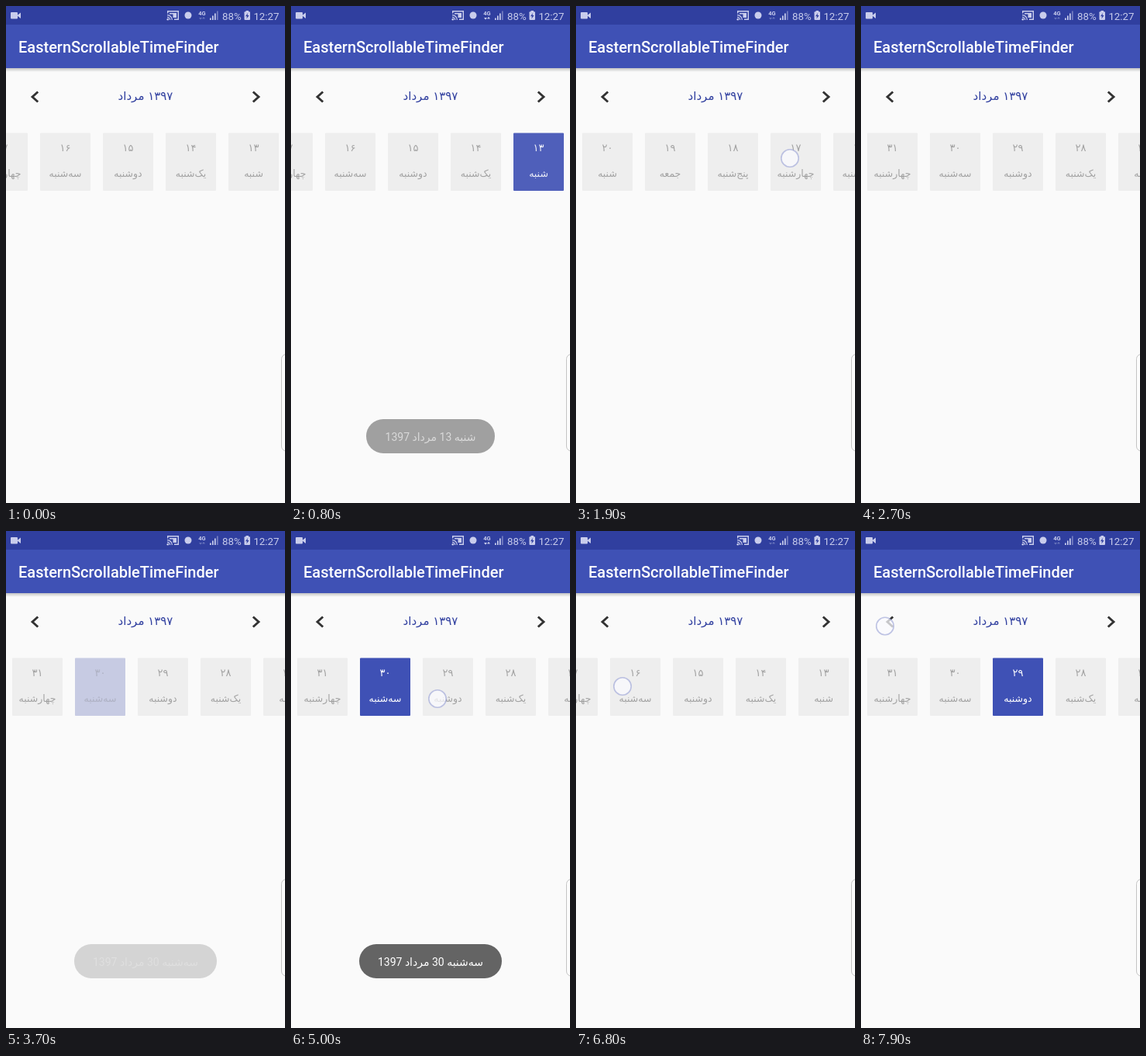
An HTML page with a canvas that plays this animation: 360 by 640 pixels, repeating every 8000 ms.

```html
<!DOCTYPE html>
<html lang="fa">
<head>
<meta charset="utf-8">
<title>Date strip</title>
<style>
html, body { margin: 0; width: 100%; height: 100%; overflow: hidden; background: #fafafa; }
canvas { display: block; width: 360px; height: 640px; }
</style>
</head>
<body>
<canvas id="stage"></canvas>
<script>
const LOOP = 8000, STEP = 100;
const BLUE = '#3f51b5', PAGE = '#fafafa', ICON = '#c9cdec';
const LATIN = 'Roboto, sans-serif';
const PERSIAN = '"DejaVu Sans", sans-serif';
const MIXED = 'Roboto, "DejaVu Sans", sans-serif';
const WEEK = ['شنبه', 'یک\u200cشنبه', 'دوشنبه', 'سه\u200cشنبه', 'چهارشنبه', 'پنج\u200cشنبه', 'جمعه'];
const FIRST_X = 287, PITCH = 81, END = 1179;

const canvas = document.getElementById('stage');
const ctx = canvas.getContext('2d');
const dpr = window.devicePixelRatio || 1;
canvas.width = 360 * dpr;
canvas.height = 640 * dpr;

const ramp = (t, a, b) => Math.min(1, Math.max(0, (t - a) / (b - a)));
const linear = p => p;
const easeIn = p => p * p;
const easeOut = p => 1 - (1 - p) ** 3;

// start, end, offset before, offset after, easing
const scrolls = [
  [1500, 1900, 0, 288, easeIn],
  [1900, 2600, 288, END, easeOut],
  [5700, 5800, END, 1079, linear],
  [5800, 6000, 1079, 224, linear],
  [6000, 6300, 224, 0, easeOut],
  [6800, 7100, 0, 260, easeIn],
  [7100, 7600, 260, END, easeOut]
];

// day, fade in, fade out
const picks = [
  [13, 600, 820, 3640, 3900],
  [30, 3640, 3900, 5200, 5450],
  [29, 5200, 5450, 9000, 9100]
];

// day, width, fade in, fade out
const toasts = [
  [13, 166, 620, 920, 1300, 1600],
  [30, 184, 3600, 3990, 5050, 5300],
  [29, 180, 5300, 5600, 5820, 6230]
];

// shown, hidden, move end, from x y, to x y
const touches = [
  [100, 400, 400, 317, 204, 317, 204],
  [1500, 2000, 1900, 40, 200, 276, 196],
  [3300, 3600, 3600, 121, 206, 121, 206],
  [5000, 5300, 5300, 189, 216, 189, 216],
  [5600, 5900, 5900, 340, 205, 150, 203],
  [6800, 7200, 7100, 60, 200, 300, 198],
  [7900, 8000, 8000, 31, 122.5, 31, 122.5]
];

const persianDigits = n => String(n).replace(/\d/g, d => String.fromCharCode(0x6f0 + +d));
const weekday = day => WEEK[(day - 13) % 7];

function scrollAt(t) {
  let x = 0;
  for (const [a, b, from, to, ease] of scrolls)
    if (t >= a) x = from + (to - from) * ease(ramp(t, a, b));
  return x;
}

function pickLevel(day, t) {
  const p = picks.find(k => k[0] === day);
  return p ? ramp(t, p[1], p[2]) * (1 - ramp(t, p[3], p[4])) : 0;
}

function text(s, x, y, font, color, align = 'center', dir = 'rtl') {
  ctx.font = font;
  ctx.fillStyle = color;
  ctx.textAlign = align;
  ctx.direction = dir;
  ctx.fillText(s, x, y);
}

function rect(x, y, w, h, color, r = 0) {
  ctx.fillStyle = color;
  ctx.beginPath();
  ctx.roundRect(x, y, w, h, r);
  ctx.fill();
}

function line(points, color, width) {
  ctx.strokeStyle = color;
  ctx.lineWidth = width;
  ctx.beginPath();
  points.forEach(([x, y]) => ctx.lineTo(x, y));
  ctx.stroke();
}

function shape(points, color) {
  ctx.fillStyle = color;
  ctx.beginPath();
  points.forEach(([x, y]) => ctx.lineTo(x, y));
  ctx.fill();
}

function disc(x, y, r, color) {
  ctx.fillStyle = color;
  ctx.beginPath();
  ctx.arc(x, y, r, 0, Math.PI * 2);
  ctx.fill();
}

function castIcon() {
  line([[208.7, 9.5], [208.7, 6.7], [222.3, 6.7], [222.3, 17.3], [217, 17.3]], ICON, 1.4);
  rect(211, 9, 9, 6, ICON);
  rect(208, 10.5, 7.5, 7.5, '#303f9f');
  disc(208.8, 17.2, 1.3, ICON);
  ctx.lineWidth = 1.2;
  for (const r of [3.6, 6.3]) {
    ctx.beginPath();
    ctx.arc(208, 18, r, -Math.PI / 2, 0);
    ctx.stroke();
  }
}

function statusBar(t) {
  rect(0, 0, 360, 24, '#303f9f');
  rect(6, 8, 9, 8.5, ICON, 1);
  shape([[14.5, 12], [19, 8.5], [19, 16], [14.5, 12.6]], ICON);
  castIcon();
  disc(235, 12, 4.5, ICON);
  text('4G', 253, 12, 'bold 7.5px ' + LATIN, ICON, 'center', 'ltr');

  const busy = (t >= 400 && t < 1500) || (t >= 3900 && t < 5500);
  ctx.globalAlpha = busy ? 1 : 0.35;
  shape([[249, 15], [253, 15], [251, 17.8]], ICON);
  shape([[253, 16.5], [257, 16.5], [255, 13.7]], ICON);
  ctx.globalAlpha = 1;

  for (let i = 0; i < 4; i++) {
    ctx.globalAlpha = i < 3 ? 1 : 0.45;
    rect(263 + i * 3, 15.5 - i * 3, 1.7, 2.5 + i * 3, ICON);
  }
  ctx.globalAlpha = 1;

  text('88%', 279, 17.5, '13.3px ' + LATIN, ICON, 'left', 'ltr');
  rect(309.5, 6, 3.5, 2, ICON);
  rect(307.5, 7.3, 7.5, 10.7, ICON, 1);
  shape([[312, 9], [309, 13.2], [311, 13.2], [310.4, 16.4], [313.6, 12], [311.5, 12]], '#303f9f');
  text('12:27', 352.5, 17.5, '13.3px ' + LATIN, ICON, 'right', 'ltr');
}

function header() {
  const shade = ctx.createLinearGradient(0, 80, 0, 85);
  shade.addColorStop(0, 'rgba(0,0,0,.22)');
  shade.addColorStop(1, 'rgba(0,0,0,0)');
  ctx.fillStyle = shade;
  ctx.fillRect(0, 80, 360, 5);
  rect(0, 24, 360, 56, BLUE);
  text('EasternScrollableTimeFinder', 16, 60, '500 20px ' + LATIN, '#fff', 'left', 'ltr');

  text('۱۳۹۷ مرداد', 180, 121, '15px ' + PERSIAN, '#303f9f');
  line([[41.2, 110.5], [34, 117], [41.2, 123.5]], '#333', 2.9);
  line([[318.8, 110.5], [326, 117], [318.8, 123.5]], '#333', 2.9);
}

function cardFace(x, day, fill, ink) {
  rect(x, 163.5, 65, 74.5, fill, 1);
  text(persianDigits(day), x + 32.5, 187, '13px ' + PERSIAN, ink);
  text(weekday(day), x + 32.5, 219.5, '12.5px ' + PERSIAN, ink);
}

function cards(t) {
  const offset = scrollAt(t);
  for (let day = 13; day <= 31; day++) {
    const x = FIRST_X - (day - 13) * PITCH + offset;
    if (x < -65 || x > 360) continue;
    const p = pickLevel(day, t);
    ctx.globalAlpha = 1 - p;
    if (p < 1) cardFace(x, day, '#eee', '#a2a2a2');
    ctx.globalAlpha = p;
    if (p > 0) cardFace(x, day, BLUE, '#fff');
    ctx.globalAlpha = 1;
  }
}

function sideHandle() {
  rect(355.5, 448.5, 20, 124.5, '#fcfcfc', 6);
  ctx.strokeStyle = '#c4c4c4';
  ctx.lineWidth = 1;
  ctx.stroke();
}

function toastLayer(t) {
  for (const [day, w, a, b, c, d] of toasts) {
    const level = ramp(t, a, b) * (1 - ramp(t, c, d));
    if (!level) continue;
    ctx.globalAlpha = level;
    rect(180 - w / 2, 532, w, 44, '#646464', 22);
    text(`${weekday(day)} ${day} مرداد 1397`, 180, 559.5, '14px ' + MIXED, '#fff');
    ctx.globalAlpha = 1;
  }
}

function touchLayer(t) {
  for (const [on, off, stop, x0, y0, x1, y1] of touches) {
    if (t < on || t >= off) continue;
    const p = ramp(t, on, stop);
    disc(x0 + (x1 - x0) * p, y0 + (y1 - y0) * p, 11.2, 'rgba(250,250,253,.75)');
    ctx.strokeStyle = 'rgba(150,158,212,.6)';
    ctx.lineWidth = 1.6;
    ctx.stroke();
  }
}

function draw(now) {
  const t = Math.floor((now % LOOP) / STEP) * STEP;
  ctx.setTransform(dpr, 0, 0, dpr, 0, 0);
  rect(0, 0, 360, 640, PAGE);
  statusBar(t);
  header();
  cards(t);
  sideHandle();
  toastLayer(t);
  touchLayer(t);
}

const start = performance.now();
function tick() {
  draw(performance.now() - start);
  requestAnimationFrame(tick);
}
tick();
</script>
</body>
</html>
```
